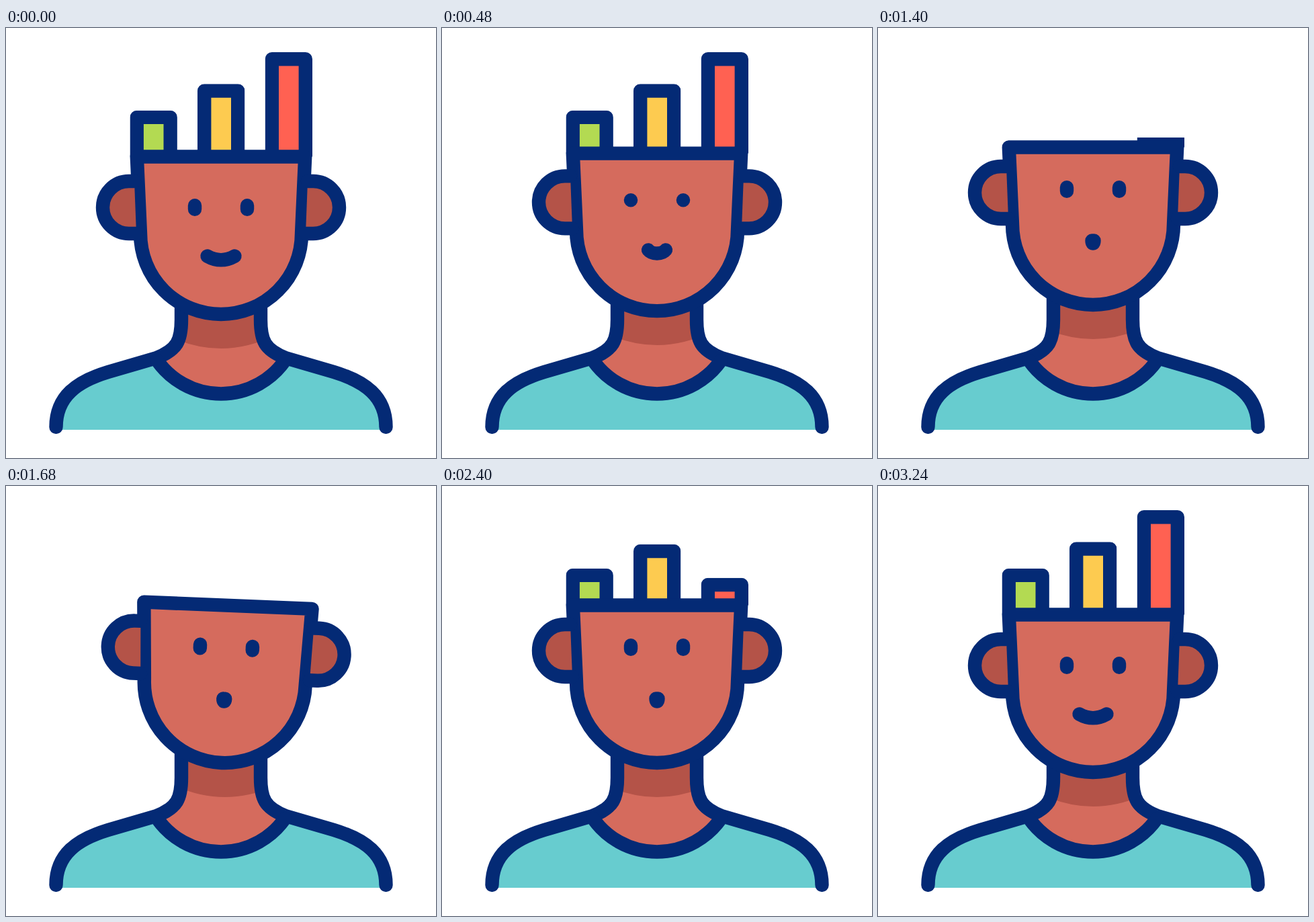
These frames come from a looping animation (640 by 640 pixels, 3.68 s). An HTML page:

```html
<!DOCTYPE html>
<html lang="en">
<head>
<meta charset="utf-8">
<title>Chart head</title>
<style>
html, body { margin: 0; width: 100%; height: 100%; overflow: hidden; background: #fff; }
body > svg { display: block; width: 100vw; height: 100vh; }
.line { stroke: #042a75; stroke-width: 20.4; stroke-linecap: round; stroke-linejoin: round; fill: none; }
.skin { fill: #d56b5d; }
.shade { fill: #b45348; }
</style>
</head>
<body>
<svg viewBox="0 0 640 640">
  <defs>
    <path id="neck" d="M261 385V434C261 465 255 479 224 491A116 116 0 0 0 416 491C385 479 379 465 379 434V385Z"/>
    <clipPath id="neckClip"><use href="#neck"/></clipPath>
  </defs>

  <path fill="#67cccf" d="M224 491L152 512C106 526 74.5 548 74.5 598H565.5C565.5 548 534 526 488 512L416 491A116 116 0 0 1 224 491Z"/>
  <use href="#neck" class="skin"/>
  <g clip-path="url(#neckClip)">
    <path id="shadow" class="shade" d="M240 380V457.5Q320 496.5 400 457.5V380Z"/>
  </g>
  <path id="side" class="line" d="M261 392V434C261 465 255 479 224 491L152 512C106 526 74.5 548 74.5 594"/>
  <use href="#side" transform="matrix(-1 0 0 1 640 0)"/>
  <path class="line" d="M225 495A116 116 0 0 0 415 495"/>

  <g id="bars"></g>
  <g id="head">
    <path class="line skin" d="M194.8 191.5H445.2L440 306A120 120 0 0 1 200 306Z"/>
  </g>
  <g id="ears">
    <path id="ear" class="line shade" d="M191 228H183A39 39 0 0 0 183 306H194"/>
    <use href="#ear" transform="matrix(-1 0 0 1 640 0)"/>
  </g>
  <g id="face">
    <path id="eyes" class="line"/>
    <path id="mouth" class="line"/>
  </g>
</svg>
<script>
const LOOP = 3680, HIDDEN = 165;
const $ = id => document.getElementById(id);
const set = (el, attrs) => { for (const k in attrs) el.setAttribute(k, attrs[k]); };

// eased 0..1 between two times
const ease = (t, a, b) => {
  const p = Math.min(1, Math.max(0, (t - a) / (b - a)));
  return p * p * (3 - 2 * p);
};
// rises during the first span, falls during the second
const pulse = (t, a, b, c, d) => ease(t, a, b) - ease(t, c, d);

const bars = [
  { x: 184.5, top: 122.7, fill: '#b3da52', span: [480, 790, 1773, 2203] },
  { x: 285, top: 83.3, fill: '#fdcb50', span: [738, 1080, 1990, 2460] },
  { x: 385.6, top: 36, fill: '#ff6152', span: [1047, 1477, 2265, 2715] }
];
const make = (name, parent) =>
  parent.appendChild(document.createElementNS('http://www.w3.org/2000/svg', name));
for (const bar of bars) {
  bar.box = make('svg', $('bars'));
  bar.rect = make('rect', bar.box);
  set(bar.box, { x: bar.x, width: 70.4 });
  set(bar.rect, { class: 'line', x: 10.2, width: 50, height: 240, style: 'fill:' + bar.fill });
}

function draw(t) {
  const lift = pulse(t, 310, 740, 2570, 3000);
  const look = pulse(t, 300, 720, 2570, 2990);
  const tilt = 2.35 * ease(t, 1400, 1690) - 4.45 * ease(t, 1690, 2090) + 2.1 * ease(t, 2090, 2320);
  const move = dy => ({ transform: `rotate(${tilt} 320 433) translate(0 ${-dy})` });

  set($('shadow'), move(14 * lift));
  set($('head'), move(14 * lift));
  set($('ears'), move(22 * lift));
  set($('face'), move(0));

  const eyeY = 267 - 27 * look;
  const half = 2.8 * (1 - 4 * look * (1 - look));
  set($('eyes'), { d: [281, 359].map(x => `M${x} ${eyeY - half}V${eyeY + half}`).join('') });

  // the smile narrows into a rounded dot
  const w = 20.5 - 19 * look, endY = 339.5 - 23 * look;
  const sag = 7.7 - 2.4 * look, inset = w * 2 / 3 * (1 - look);
  set($('mouth'), { d: `M${320 - w} ${endY}c${inset} ${sag} ${2 * w - inset} ${sag} ${2 * w} 0` });

  const rim = 191.5 - 14 * lift;
  for (const bar of bars) {
    const top = bar.top + (HIDDEN - bar.top) * pulse(t, ...bar.span);
    const clip = top + Math.max(0, (top - 137) / 2);
    set(bar.box, { y: clip, height: Math.max(0, rim - clip) });
    set(bar.rect, { y: top - clip + 10.2 });
  }
}

const start = performance.now();
function tick() {
  draw((performance.now() - start) % LOOP);
  requestAnimationFrame(tick);
}
tick();
</script>
</body>
</html>
```
